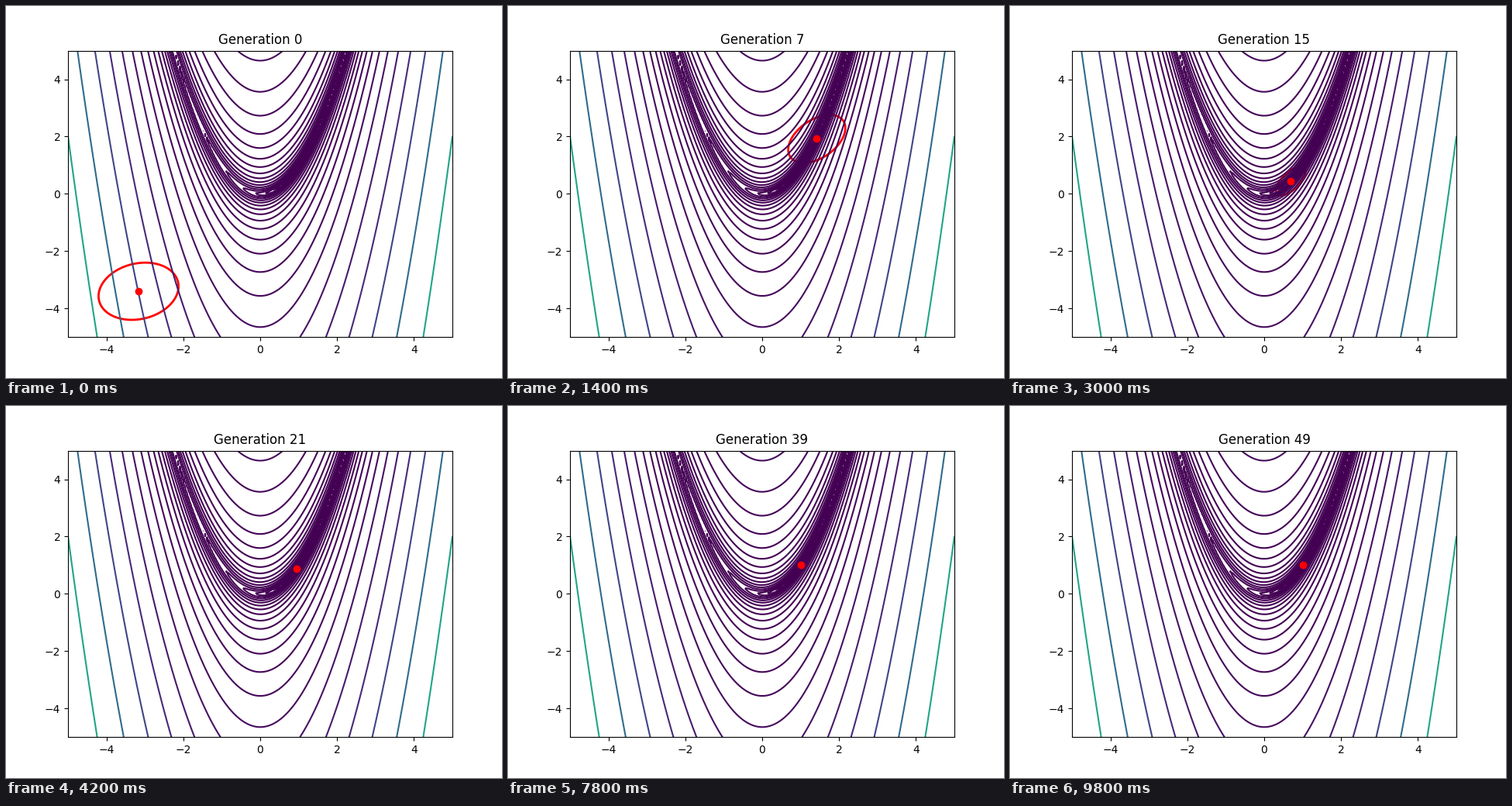
Animation, 640 px wide and 480 px high, one loop 10 s. Source, as a matplotlib script:

```python
import numpy as np
import matplotlib.pyplot as plt
from matplotlib.animation import FuncAnimation
from matplotlib.patches import Polygon

GENERATIONS = 50
RUN_IN = 7  # generations spent travelling to the valley

# Turning points of the mean: generation, x, y
STOPS = [(0, -3.165, -3.40), (RUN_IN, 1.42, 1.92), (15, 0.69, 0.45),
         (21, 0.955, 0.89), (29, 0.995, 0.985), (37, 1, 1)]


def rosenbrock(x, y):
    return (1 - x) ** 2 + 100 * (y - x ** 2) ** 2


def mean_at(gen):
    for (g0, *p0), (g1, *p1) in zip(STOPS, STOPS[1:]):
        if gen <= g1:
            u = (gen - g0) / (g1 - g0)
            ease = u * u * (3 - 2 * u)
            return np.array(p0) + ease * np.subtract(p1, p0)
    return np.array(STOPS[-1][1:])


def ellipse_at(gen):
    """Outline of the search spread: widens at first, then shrinks."""
    sx = 1.04 * np.exp(-0.032 * gen - 0.0023 * gen ** 2)
    if gen < RUN_IN:
        sx *= 1 + 0.45 * np.sin(np.pi * gen / RUN_IN)
    sy = sx * (0.96 + 0.024 * gen)
    rho = 1 - 0.83 * np.exp(-gen / 17)
    t = np.linspace(0, 2 * np.pi, 120, endpoint=False)
    shape = np.column_stack([sx * np.cos(t), sy * np.cos(t - np.arccos(rho))])
    return mean_at(gen) + shape


fig, ax = plt.subplots(figsize=(6.4, 4.8), dpi=100)

axis = np.linspace(-5, 5, 200)
X, Y = np.meshgrid(axis, axis)
Z = rosenbrock(X, Y)
levels = np.logspace(np.log10(Z.min()), np.log10(Z.max()), 30)
ax.contour(X, Y, Z, levels=levels, cmap="viridis")

# The ellipse sits below the contour lines, the mean above them.
ellipse = Polygon(ellipse_at(0), closed=True, fill=False,
                  edgecolor="red", linewidth=2, zorder=1)
ax.add_patch(ellipse)
mean, = ax.plot([], [], "ro", zorder=3)
ax.set_xlim(-5, 5)
ax.set_ylim(-5, 5)
title = ax.set_title("Generation 0")


def update(gen):
    x, y = mean_at(gen)
    ellipse.set_xy(ellipse_at(gen))
    mean.set_data([x], [y])
    title.set_text(f"Generation {gen}")
    return ellipse, mean, title


anim = FuncAnimation(fig, update, frames=GENERATIONS, interval=200,
                     repeat=True, repeat_delay=0)
plt.show()
```
